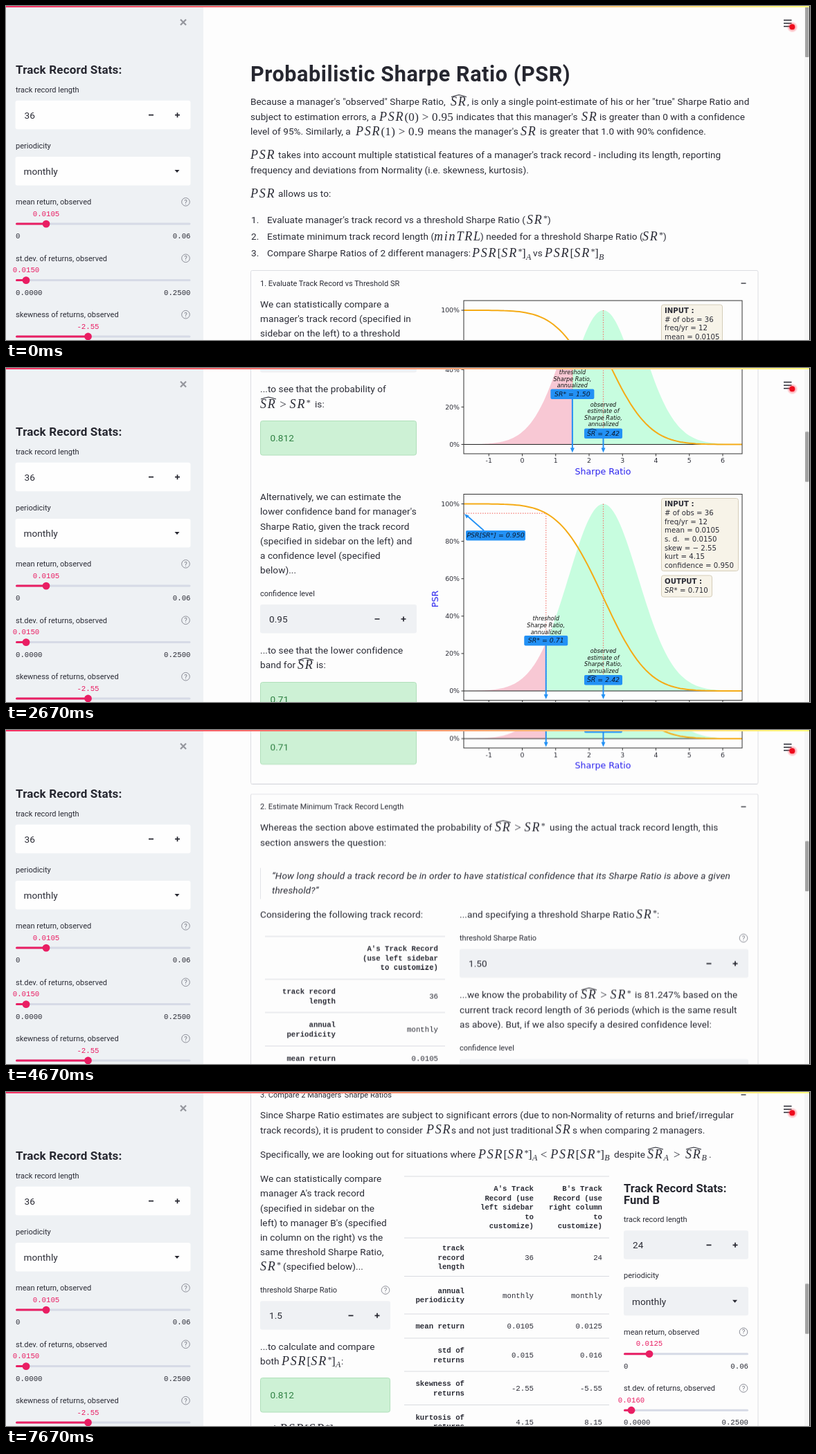
Animation, 1161 px wide and 483 px high, one loop 8000 ms. Source, as an HTML page:

```html
<!DOCTYPE html>
<html lang="en">
<head>
<meta charset="utf-8">
<title>Probabilistic Sharpe Ratio</title>
<style>
html, body { margin: 0; width: 100%; height: 100%; overflow: hidden; background: #fdfdfd; }
svg { display: block; width: 1161px; height: 483px; }
text { white-space: pre; fill: #2b2c36; font-family: Roboto, "Open Sans", sans-serif; }
.body { font-size: 13.6px; letter-spacing: .06px; }
.it { font-style: italic; }
.body.it { letter-spacing: .13px; }
.label { font-size: 11px; }
.h1 { font-size: 30.6px; font-weight: 700; letter-spacing: .55px; fill: #262730; }
.h2 { font-size: 17px; font-weight: 700; letter-spacing: .17px; fill: #262730; }
.h3 { font-size: 16.6px; font-weight: 700; letter-spacing: .1px; fill: #262730; }
.mono { font: 10.7px "Liberation Mono", "DejaVu Sans Mono", monospace; }
.bold { font-weight: 700; }
.pink { fill: #e91e63; }
.ok { fill: #2e8042; }
.math { font: 17px "Liberation Serif", "Noto Serif", serif; letter-spacing: .3px; }
.var { font-style: italic; font-size: 18px; letter-spacing: 1.8px; }
.idx { font-style: italic; font-size: 12px; letter-spacing: 0; }
.fig, .tick, .note, .tag, .axis { font-family: "DejaVu Sans", sans-serif; }
.fig { font-size: 10.2px; }
.tick { font-size: 9.4px; }
.note { font-size: 8.1px; font-style: italic; fill: #111; }
.tag { font-size: 9.4px; font-style: italic; fill: #0a1a30; }
.axis { font-size: 12.6px; fill: #2a22ee; }
</style>
</head>
<body>
<script>
const SIZE = { body: 13.6, label: 11, h1: 30.6, h2: 17, h3: 16.6, mono: 10.7,
  fig: 10.2, tick: 9.4, note: 8.1, tag: 9.4, axis: 12.6 };
let out = [];
const add = s => out.push(s);
const flush = () => { const s = out.join(''); out = []; return s; };
const esc = s => s.replace(/&/g, '&amp;').replace(/</g, '&lt;').replace(/>/g, '&gt;');
const slant = s => s.replace(/P?SR/g, '<tspan class="it">$&</tspan>');

// y is always the middle of the capitals
function text(x, y, s, cls = 'body', anchor = 'start') {
  const base = y + SIZE[cls.split(' ')[0]] * 0.36;
  const inner = cls === 'fig' ? slant(esc(s)) : esc(s);
  add(`<text x="${x}" y="${base}" class="${cls}" text-anchor="${anchor}">${inner}</text>`);
}
function rect(x, y, w, h, fill, stroke = 'none', r = 0) {
  add(`<rect x="${x}" y="${y}" width="${w}" height="${h}" rx="${r}" fill="${fill}" stroke="${stroke}"/>`);
}
function path(d, stroke, w = 1, extra = '') {
  add(`<path d="${d}" fill="none" stroke="${stroke}" stroke-width="${w}" ${extra}/>`);
}

// "~" puts a wide hat on the first two letters, "^" raises and "_" lowers one sign
function math(x, y, s) {
  if (s[0] === '~') {
    s = s.slice(1);
    path(`M${x + 1} ${y - 7}q6 -2 11 -3q5 1 11 3`, '#2b2c36', 1.2);
  }
  let level = 0;
  const spans = s.match(/[\^_].|[A-Za-z]+|[^A-Za-z^_]+/g).map(t => {
    const to = t[0] === '^' ? -4 : t[0] === '_' ? 3.5 : 0;
    const dy = to - level;
    level = to;
    const cls = to ? 'idx' : /[A-Za-z]/.test(t) ? 'var' : '';
    return `<tspan dy="${dy}" class="${cls}">${esc(to ? t[1] : t)}</tspan>`;
  });
  add(`<text x="${x}" y="${y + 5.5}" class="math">${spans.join('')}</text>`);
}
// row(y, x, piece, x, piece, ...); a leading "$" marks math
function row(y, ...p) {
  for (let i = 0; i < p.length; i += 2) {
    if (p[i + 1][0] === '$') math(p[i], y, p[i + 1].slice(1));
    else text(p[i], y, p[i + 1]);
  }
}
function lines(x, y, list, cls = 'body', step = 21.2, anchor = 'start') {
  list.forEach((s, i) => text(x, y + i * step, s, cls, anchor));
}

function help(x, y) {
  add(`<circle cx="${x}" cy="${y}" r="5.8" fill="none" stroke="#8a8c96"/>`);
  add(`<text x="${x}" y="${y + 3.4}" text-anchor="middle" style="font-size:9.5px;fill:#777983">?</text>`);
}
const BLACK = '#262730', FIELD = '#eff1f4';
function field(x, y, w, value, bg = FIELD) {
  rect(x, y, w, 41.5, bg, 'none', 3);
  text(x + 13, y + 21, value);
  const p = x + w - 19, m = p - 38;
  path(`M${m - 3.5} ${y + 21}h7M${p - 3.5} ${y + 21}h7M${p} ${y + 17.5}v7`, BLACK, 1.7);
}
function select(x, y, w, bg = FIELD) {
  rect(x, y, w, 41.5, bg, 'none', 3);
  text(x + 12, y + 21, 'monthly');
  add(`<path d="M${x + w - 23} ${y + 19}h7l-3.5 4z" fill="${BLACK}"/>`);
}
function slider(x, y, end, knob, name, value, min, max) {
  text(x, y, name, 'label');
  help(end - 7, y);
  text(knob, y + 16.5, value, 'mono pink', 'middle');
  rect(x, y + 30.3, end - x, 3, '#d6dae6', 'none', 1.5);
  rect(x, y + 30.3, knob - x, 3, '#e91e63', 'none', 1.5);
  add(`<circle cx="${knob}" cy="${y + 31.8}" r="5.4" fill="#e91e63"/>`);
  text(x, y + 49, min, 'mono');
  text(end, y + 49, max, 'mono', 'end');
}
function success(x, y, w, value) {
  rect(x + .5, y + .5, w - 1, 49.5, '#cdf1d5', '#b0dfba', 3);
  text(x + 14.5, y + 25, value, 'body ok');
}
function panel(y, h, title) {
  rect(353.5, y, 732.5, h, 'none', '#dcdde2', 2);
  text(367, y + 18.5, title, 'label');
  path(`M1061.5 ${y + 18.5}h7`, BLACK, 1.3);
}
function table(x0, x1, ys, head, labelX, cols, rows) {
  ys.forEach(y => path(`M${x0} ${y}H${x1}`, '#d9dbe0'));
  const block = (x, i, list) => {
    const mid = (ys[i] + ys[i + 1]) / 2;
    lines(x, mid - (list.length - 1) * 6.75, list, 'mono bold', 13.5, 'end');
  };
  head.forEach((h, i) => block(cols[i], 0, h.split('/')));
  rows.forEach(([name, ...vals], i) => {
    block(labelX, i + 1, name.split('/'));
    vals.forEach((v, c) => text(cols[c], (ys[i + 1] + ys[i + 2]) / 2, v, 'mono', 'end'));
  });
}

const MEAN = 2.425, SD = 1.0425, BLUE = '#2391f5';
const X = v => 745.5 + 48.25 * v, Y = p => 270.5 * (1 - p);
const bell = v => Math.exp(-(((v - MEAN) / SD) ** 2) / 2);
const tail = v => { const z = (v - MEAN) / SD; return 1 / (1 + Math.exp(1.5976 * z + .07056 * z ** 3)); };
function curve(f, a, b) {
  const pts = [];
  for (let i = 0; i <= 90; i++) {
    const v = a + (b - a) * i / 90;
    pts.push(X(v).toFixed(1) + ' ' + Y(f(v)).toFixed(1));
  }
  return pts.join('L');
}
function area(a, b, fill) {
  add(`<path d="M${X(a)} ${Y(0)}L${curve(bell, a, b)}L${X(b)} ${Y(0)}z" fill="${fill}"/>`);
}
function tag(x, y, w, s) {
  rect(x - w / 2, y - 7, w, 14.5, BLUE, 'none', 2);
  text(x, y, s, 'tag', 'middle');
}
function down(x, y) {
  path(`M${x} ${y}V277`, BLUE, 2);
  add(`<path d="M${x - 3} 275.5h6l-3 7z" fill="${BLUE}"/>`);
}
function card(y, h, w, title, list, step) {
  rect(946.5, y, w, h, '#f7f3e8', '#d5cdb9', 3);
  text(951, y + 8, title, 'fig bold');
  lines(951, y + 21, list, 'fig', step);
}
function chart(y, limit, prob, lastIn, wIn, result, wOut) {
  const lo = -1.75, hi = 6.58, tx = X(limit), mx = X(MEAN), py = Y(prob);
  add(`<g transform="translate(0 ${y})">`);
  area(lo, limit, '#f8c8d4');
  area(limit, hi, '#c7fddf');
  const dots = 'stroke-dasharray="1.4 2"';
  path(`M661 ${py}H${tx}V${Y(0)}M${mx} 0V${Y(0)}`, '#f4736c', 1.2, dots);
  path(`M661 ${Y(0)}H1063`, '#222', 1.1);
  path('M' + curve(tail, lo, hi), '#f5ab16', 2);
  rect(661, -14, 402, 298, 'none', '#333');
  for (let p = 0; p <= 100; p += 20) {
    path(`M657.5 ${Y(p / 100)}h3.5`, '#333');
    text(655, Y(p / 100), p + '%', 'tick', 'end');
  }
  for (let v = -1; v <= 6; v++) {
    path(`M${X(v)} 284v3.5`, '#333');
    text(X(v), 294, String(v), 'tick', 'middle');
  }
  text(862, 309, 'Sharpe Ratio', 'axis', 'middle');
  add(`<text transform="translate(623.5 137.5) rotate(-90)" class="axis" text-anchor="middle">PSR</text>`);
  path(`M690 ${py + 25}L665 ${py + 3}`, BLUE, 1.8);
  add(`<path d="M662 ${py + 1}l6.5 2.5l-3.5 4z" fill="${BLUE}"/>`);
  tag(707, py + 32, 86, 'PSR[SR*] = ' + prob.toFixed(3));
  down(tx, 203);
  down(mx, 260);
  lines(tx, 166, ['threshold', 'Sharpe Ratio,', 'annualized'], 'note', 9.6, 'middle');
  tag(tx, 197.5, 63, 'SR* = ' + limit.toFixed(2));
  lines(mx, 213, ['observed', 'estimate of', 'Sharpe Ratio,', 'annualized'], 'note', 9.5, 'middle');
  tag(mx, 254.5, 55, 'SR = 2.42');
  path(`M${mx - 22} 250l6 -2l6 2`, '#0a1a30', .9);
  card(-8, 105, wIn, 'INPUT :', ['# of obs = 36', 'freq/yr = 12', 'mean = 0.0105', 's. d.  = 0.0150',
    'skew = − 2.55', 'kurt = 4.15', lastIn], 12.6);
  card(103.5, 31, wOut, 'OUTPUT :', [result], 0);
  add('</g>');
}

function page() {
  text(353, 98, 'Probabilistic Sharpe Ratio (PSR)', 'h1');
  row(138.5, 353, 'Because a manager\'s "observed" Sharpe Ratio,', 642, '$~SR',
    666, ', is only a single point-estimate of his or her "true" Sharpe Ratio and');
  row(160, 353, 'subject to estimation errors, a', 539, '$PSR(0) > 0.95',
    650, "indicates that this manager's", 831, '$SR', 857, 'is greater than 0 with a confidence');
  row(181, 353, 'level of 95%. Similarly, a', 505, '$PSR(1) > 0.9',
    609, "means the manager's", 743, '$SR', 771, 'is greater that 1.0 with 90% confidence.');
  row(215.5, 353, '$PSR', 393, "takes into account multiple statistical features of a manager's track record - including its length, reporting");
  row(237, 353, 'frequency and deviations from Normality (i.e. skewness, kurtosis).');
  row(271.5, 353, '$PSR', 393, 'allows us to:');
  row(309, 354, '1.', 377, "Evaluate manager's track record vs a threshold Sharpe Ratio (", 752, '$SR^*', 782, ')');
  row(333, 354, '2.', 377, 'Estimate minimum track record length (', 618, '$minTRL',
    685, ') needed for a threshold Sharpe Ratio (', 919, '$SR^*', 949, ')');
  row(357.5, 354, '3.', 377, 'Compare Sharpe Ratios of 2 different managers:', 673, '$PSR[SR^*]_A',
    761, 'vs', 778, '$PSR[SR^*]_B');

  panel(382.5, 750, '1. Evaluate Track Record vs Threshold SR');
  lines(367, 431, ['We can statistically compare a', "manager's track record (specified in",
    'sidebar on the left) to a threshold']);
  row(494.5, 367, 'Sharpe Ratio,', 452, '$SR^*', 485, '(specified');
  row(516, 367, 'below)...');
  text(367, 550, 'threshold Sharpe Ratio', 'label');
  help(586.5, 550);
  field(367, 565, 226, '1.5');
  row(630.5, 367, '...to see that the probability of');
  row(652, 367, '$~SR > SR^*', 446, 'is:');
  success(367, 676, 226, '0.812');
  lines(367, 786.3, ['Alternatively, we can estimate the', "lower confidence band for manager's",
    'Sharpe Ratio, given the track record', '(specified in sidebar on the left) and',
    'a confidence level (specified', 'below)...']);
  text(367, 926.5, 'confidence level', 'label');
  field(367, 942, 226, '0.95');
  row(1007.8, 367, '...to see that the lower confidence');
  row(1029.5, 367, 'band for', 421, '$~SR', 448, 'is:');
  success(367, 1054, 226, '0.71');
  chart(440, 1.5, .812, 'SR* = 1.500', 88, 'PSR[SR* ] = 0.812', 102);
  chart(796.5, .71, .95, 'confidence = 0.950', 111, 'SR* = 0.710', 73);

  panel(1147, 650, '2. Estimate Minimum Track Record Length');
  row(1195.5, 367, 'Whereas the section above estimated the probability of', 706, '$~SR > SR^*',
    785, 'using the actual track record length, this');
  row(1217, 367, 'section answers the question:');
  path('M367.5 1254V1299', '#e2e3e8');
  lines(384, 1265, ['“How long should a track record be in order to have statistical confidence that its Sharpe Ratio is above a given',
    'threshold?”'], 'body it');
  row(1321, 367, 'Considering the following track record:',
    655, '...and specifying a threshold Sharpe Ratio', 910, '$SR^*', 940, ':');
  table(374, 634, [1353, 1415, 1463, 1511.5, 1546, 1581, 1629.5, 1678, 1726.5],
    ["A's Track Record/(use left sidebar/to customize)"], 476, [624], [
      ['track record/length', '36'], ['annual/periodicity', 'monthly'], ['mean return', '0.0105'],
      ['std of returns', '0.015'], ['skewness of/returns', '-2.55'], ['kurtosis of/returns', '4.15'],
      ['annualized/Sharpe Ratio', '2.4249']]);
  text(655, 1355.5, 'threshold Sharpe Ratio', 'label');
  help(1065, 1355.5);
  field(655, 1371.3, 417, '1.50');
  row(1437.5, 655, '...we know the probability of', 830, '$~SR > SR^*', 908, 'is 81.247% based on the');
  lines(655, 1459, ['current track record length of 36 periods (which is the same result',
    'as above). But, if we also specify a desired confidence level:']);
  text(655, 1514, 'confidence level', 'label');
  field(655, 1530.5, 417, '0.95');
  row(1596.3, 655, "...we'll see that we need returns for at least:");
  success(655, 1620.5, 417, '121.35');
  row(1695.8, 655, 'periods to feel confident that', 834, '$~SR', 861, '(of 2.42 )',
    919, '$>', 936, '$SR^*', 971, '(of 1.5 ) with');
  row(1717, 655, 'statistical confidence of 95.0%.');
  lines(655, 1751.5, ['(note: minTRL is in the same periodicity as original track record',
    'entered on the left)'], 'body it');

  panel(1811.5, 900, "3. Compare 2 Managers' Sharpe Ratios");
  row(1859.5, 367, 'Since Sharpe Ratio estimates are subject to significant errors (due to non-Normality of returns and brief/irregular');
  row(1880.7, 367, 'track records), it is prudent to consider', 607, '$PSR', 643, 's and not just traditional',
    793, '$SR', 818, 's when comparing 2 managers.');
  row(1916, 367, 'Specifically, we are looking out for situations where', 682, '$PSR[SR^*]_A < PSR[SR^*]_B',
    878, 'despite', 926, '$~SR_A', 964, '$>', 981, '$~SR_B', 1015, '.');
  lines(367, 1951.3, ['We can statistically compare', "manager A's track record", '(specified in sidebar on the',
    "left) to manager B's (specified", 'in column on the right) vs the', 'same threshold Sharpe Ratio,']);
  row(2078.5, 367, '$SR^*', 400, '(specified below)...');
  text(367, 2112.5, 'threshold Sharpe Ratio', 'label');
  help(548, 2112.5);
  field(367, 2128.3, 188, '1.5');
  row(2194, 367, '...to calculate and compare');
  row(2215.3, 367, 'both', 398, '$PSR[SR^*]_A', 484, ':');
  success(367, 2239, 188, '0.812');
  row(2313, 367, 'and', 395, '$PSR[SR^*]_B', 481, ':');
  table(575, 871, [1948, 2037, 2092.5, 2147, 2182, 2230, 2278.5, 2327],
    ["A's Track/Record (use/left sidebar/to/customize)", "B's Track/Record (use/right column/to/customize)"],
    662, [762, 861], [
      ['track/record/length', '36', '24'], ['annual/periodicity', 'monthly', 'monthly'],
      ['mean return', '0.0105', '0.0125'], ['std of/returns', '0.015', '0.016'],
      ['skewness of/returns', '-2.55', '-5.55'], ['kurtosis of/returns', '4.15', '8.15']]);
  lines(892, 1964.7, ['Track Record Stats:', 'Fund B'], 'h3', 17.3);
  text(892, 2010.5, 'track record length', 'label');
  field(892, 2026.3, 180, '24');
  text(892, 2091.5, 'periodicity', 'label');
  select(892, 2107.8, 180);
  slider(892, 2173, 1072, 929, 'mean return, observed', '0.0125', '0', '0.06');
  slider(892, 2254.4, 1072, 903, 'st.dev. of returns, observed', '0.0160', '0.0000', '0.2500');
}

function sidebar() {
  rect(0, 0, 285, 483, '#eef1f4');
  path('M252 19.5l8 8m0 -8l-8 8', '#93959c', 2.2);
  text(14, 92, 'Track Record Stats:', 'h2');
  text(14, 121, 'track record length', 'label');
  field(13.5, 136.7, 253, '36', '#fefefe');
  text(14, 202, 'periodicity', 'label');
  select(13.5, 218, 253, '#fefefe');
  slider(14, 283.3, 266.5, 58, 'mean return, observed', '0.0105', '0', '0.06');
  slider(14, 364.8, 266.5, 29, 'st.dev. of returns, observed', '0.0150', '0.0000', '0.2500');
  slider(14, 446.2, 266.5, 118.5, 'skewness of returns, observed', '-2.55', '-10', '10');
}

function chrome() {
  path('M1123 20.5h11.5M1123 25h11.5M1123 29.5h11.5', BLACK, 1.6);
  add('<circle cx="1135.5" cy="30.5" r="8" fill="url(#glow)"/><circle cx="1135.3" cy="30.2" r="3.9" fill="#ee0a1c"/>');
  rect(1153, 0, 7, 483, '#f6f6f6');
  add('<rect id="thumb" x="1154" y="1.5" width="5.5" height="72.5" rx="1" fill="#a3a3a3"/>');
  rect(1160, 0, 1, 483, '#111');
  rect(0, 0, 1160, 2, 'url(#bar)');
}

page();
const content = flush();
sidebar();
chrome();
document.body.innerHTML = `<svg viewBox="0 0 1161 483" xmlns="http://www.w3.org/2000/svg">
<defs>
<linearGradient id="bar"><stop offset="0" stop-color="#f63366"/><stop offset="1" stop-color="#fffd80"/></linearGradient>
<radialGradient id="glow"><stop offset=".4" stop-color="#ff3b4b" stop-opacity=".6"/><stop offset="1" stop-color="#ff5a68" stop-opacity="0"/></radialGradient>
</defs>
<g id="page">${content}</g>${flush()}</svg>`;

// [tick, scroll offset]; 24 ticks per loop, even steps between the stops
const STOPS = [[0, 0], [4, 219], [8, 600], [10, 710.5], [14, 1054.5], [17, 1322], [23, 1826], [24, 1826]];
const LEAD = 5; // steps fall on whole hundredths of a second, just before each third
function scroll(id, ratio) {
  const frames = STOPS.map(([tick, y], i) => ({
    offset: tick / 24,
    transform: `translateY(${y * ratio}px)`,
    easing: i < STOPS.length - 1 ? `steps(${STOPS[i + 1][0] - tick}, end)` : 'linear'
  }));
  document.getElementById(id).animate(frames, { duration: 8000, delay: -LEAD, iterations: Infinity });
}
scroll('page', -1);
scroll('thumb', .151);
</script>
</body>
</html>
```
